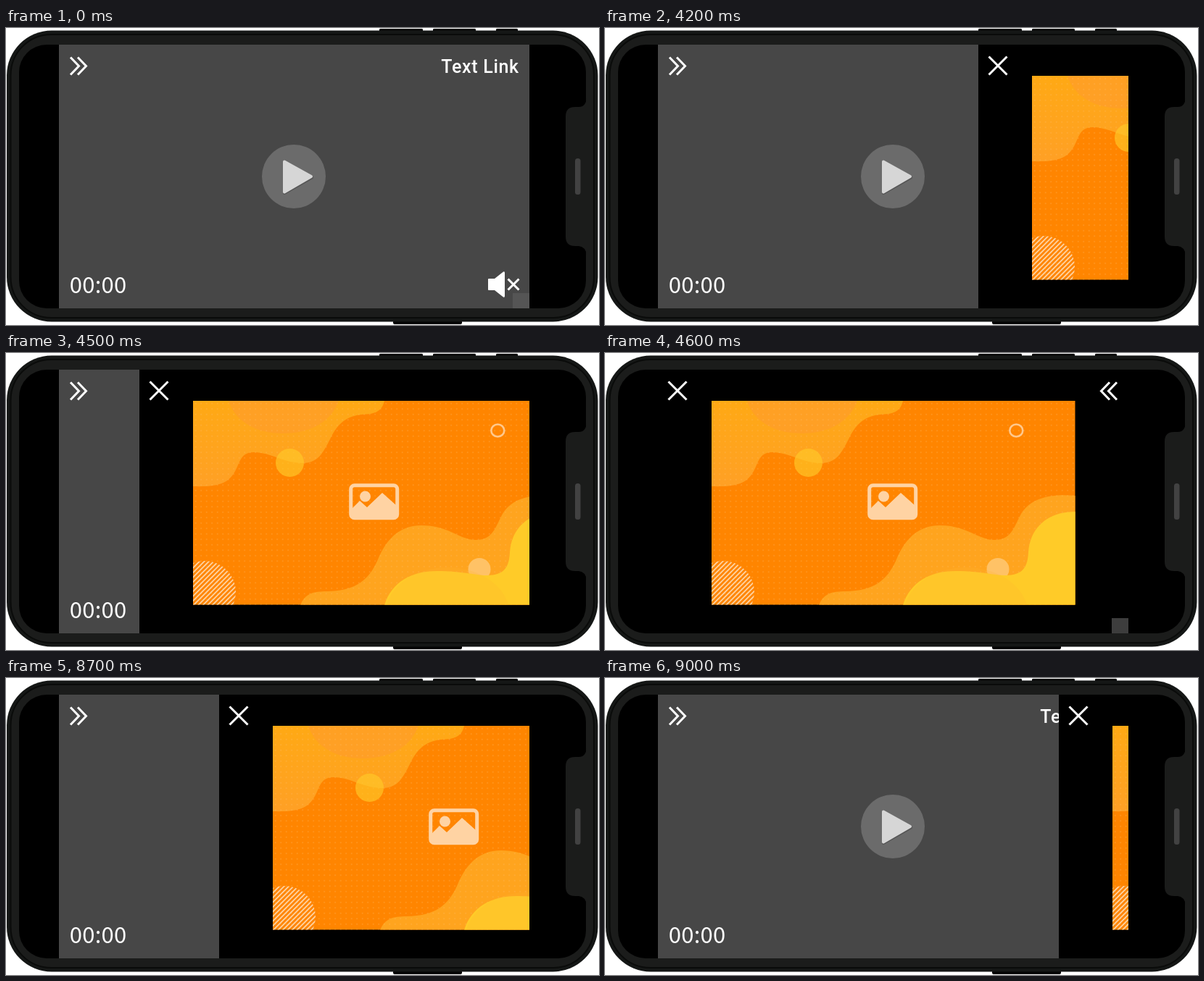
These frames come from a looping animation (818x410 px, 9.1 s). An HTML page:

```html
<!DOCTYPE html>
<html lang="en">
<head>
<meta charset="utf-8">
<title>Swipe video ad</title>
<style>
html, body { margin: 0; width: 100%; height: 100%; overflow: hidden; background: #fff; }
svg { display: block; width: 818px; height: 410px; }
.line { fill: none; stroke: #fff; stroke-width: 3; }
.link { font: 500 25px Roboto, sans-serif; letter-spacing: .65px; fill: #fff; }
.time { font: 400 31px "Noto Sans CJK JP", "Noto Sans CJK SC", "Noto Sans", sans-serif; letter-spacing: .3px; fill: #fff; }
</style>
</head>
<body>
<svg viewBox="0 0 818 410">
  <defs>
    <clipPath id="screen"><rect x="73" y="23" width="649" height="364"/></clipPath>
    <clipPath id="art"><rect x="147" y="66" width="501.5" height="281.5"/></clipPath>
    <pattern id="dots" x="147" y="66" width="7.5" height="7.5" patternUnits="userSpaceOnUse">
      <circle cx="3.7" cy="3.7" r="1" fill="#ffc070" opacity=".32"/>
    </pattern>
    <pattern id="stripes" width="4.6" height="4.6" patternUnits="userSpaceOnUse" patternTransform="rotate(-45)">
      <rect width="4.6" height="1.8" fill="#ffd3a3"/>
    </pattern>
    <linearGradient id="amber" x1="0" y1="0" x2="0" y2="1">
      <stop offset="0" stop-color="#ffa914"/>
      <stop offset="1" stop-color="#ffa025"/>
    </linearGradient>
    <path id="chevrons" class="line" d="M89 40.5L100.5 52.5L89 64.5M99 40.5L110.5 52.5L99 64.5"/>
  </defs>

  <g id="phone">
    <path fill="#000" d="M515 6V2q0-1 2-1h56q2 0 2 1v4zM589 6V2q0-1 2-1h55q2 0 2 1v4zM676 6V2q0-1 2-1h26q2 0 2 1v4zM534 403h95v4q0 2-2 2h-91q-2 0-2-2z"/>
    <rect x="1" y="3.5" width="815.5" height="402" rx="62" fill="#151716"/>
    <rect x="6.5" y="9" width="804.5" height="391" rx="56" fill="#1b1c1b" stroke="#0a0b0a" stroke-width="2"/>
    <rect x="18" y="23" width="782" height="364" rx="38"/>
    <path fill="#1b1c1b" d="M801 96Q800 109 790 109H785Q772 109 772 122V288Q772 301 785 301H790Q800 302 801 314Z"/>
    <rect x="785" y="180" width="7.5" height="50" rx="3.5" fill="#424242"/>
  </g>

  <g clip-path="url(#screen)">
    <g id="video">
      <rect x="73" y="23" width="649" height="364" fill="#474747"/>
      <use href="#chevrons"/>
      <text class="link" x="600.3" y="61.5">Text Link</text>
      <circle cx="397" cy="205" r="44" fill="#6b6b6b"/>
      <path id="shade" d="M384 185L422 206.500L384 228Z" fill="#555" stroke="#555" stroke-width="4" stroke-linejoin="round"/>
      <path d="M384 184.500L421 205L384 226.500Z" fill="#d6d6d6" stroke="#d6d6d6" stroke-width="4" stroke-linejoin="round"/>
      <text class="time" x="87.7" y="366.3">00:00</text>
      <path fill="#fff" d="M666 346H674L686 336.500Q688 335.500 688 338V370Q688 372.500 686 371.500L674 362H666Q665 362 665 361V347Q665 346 666 346Z"/>
      <path class="line" d="M692.500 346.500L707.500 361.500M707.500 346.500L692.500 361.500"/>
      <rect x="699" y="366" width="23" height="21" fill="#555"/>
    </g>

    <g id="panel">
      <rect x="73" y="23" width="649" height="364"/>
      <path class="line" stroke-width="2.800" d="M87.500 39.500L112.500 64.500M112.500 39.500L87.500 64.500"/>
      <use href="#chevrons" transform="matrix(-1 0 0 1 795 0)"/>
      <rect x="699" y="366" width="23" height="21" fill="#3d3d3d"/>

      <g clip-path="url(#art)">
        <rect x="147" y="66" width="502" height="282" fill="#ff8500"/>
        <path fill="url(#amber)" d="M147 66H411C408 80 398 84 386 84.500C362 85 349 95 339 113C328 134 322 152 298 152C272 152 254 137 231 137C210 137 212 155 202 168C193 181 178 185 147 184Z"/>
        <path fill="#ff9c2e" opacity=".6" d="M196 66C205 95 235 111 270 111C312 111 338 93 348 66Z"/>
        <path fill="#ffa41e" d="M295 348C302 332 312 329 332 329C370 328 389 315 402 285C416 251 437 238 462 238C500 238 514 258 537 258C561 258 564 240 574 222C588 198 620 194 649 197V348Z"/>
        <rect x="147" y="66" width="502" height="282" fill="url(#dots)"/>
        <circle cx="280.500" cy="151.500" r="19.500" fill="#ffc928" opacity=".65"/>
        <circle cx="542" cy="298.500" r="15.500" fill="#ffc266"/>
        <path fill="#ffcb28" d="M411 348C421 316 449 301 483 301C520 301 536 307 552 307C577 307 583 295 584 275C586 242 610 219 649 219V348Z"/>
        <ellipse cx="498" cy="362" rx="86" ry="66" fill="#ffb030" opacity=".22"/>
        <circle cx="163" cy="330" r="43" fill="url(#stripes)"/>
        <ellipse cx="567.300" cy="107" rx="9" ry="8.500" fill="none" stroke="#ffc88c" stroke-width="2.600"/>
        <rect x="364.700" y="182.700" width="64" height="45" rx="5" fill="none" stroke="#ffd3a3" stroke-width="5"/>
        <path fill="#ffd3a3" d="M367 214L377 204L387 213L408 193L427 210V226H367Z"/>
        <circle cx="384.500" cy="198" r="7.500" fill="#ffd3a3"/>
      </g>
    </g>
  </g>
</svg>
<script>
const LOOP = 9100, OPEN = 4100, CLOSE = 8600, TICK = 100;
const WIDTH = 649, STEP = 110.6;
const panel = document.getElementById('panel');

// The panel slides in discrete ticks, five of them across the screen.
function offset(t) {
  if (t < OPEN) return WIDTH;
  if (t < CLOSE) return STEP * Math.max(0, 5 - Math.floor((t - OPEN) / TICK));
  return STEP * (1 + Math.floor((t - CLOSE) / TICK));
}

function render(t) {
  panel.setAttribute('transform', `translate(${Math.round(offset(t))} 0)`);
}

const start = performance.now();
function loop() {
  render((performance.now() - start) % LOOP);
  requestAnimationFrame(loop);
}
loop();
</script>
</body>
</html>
```
